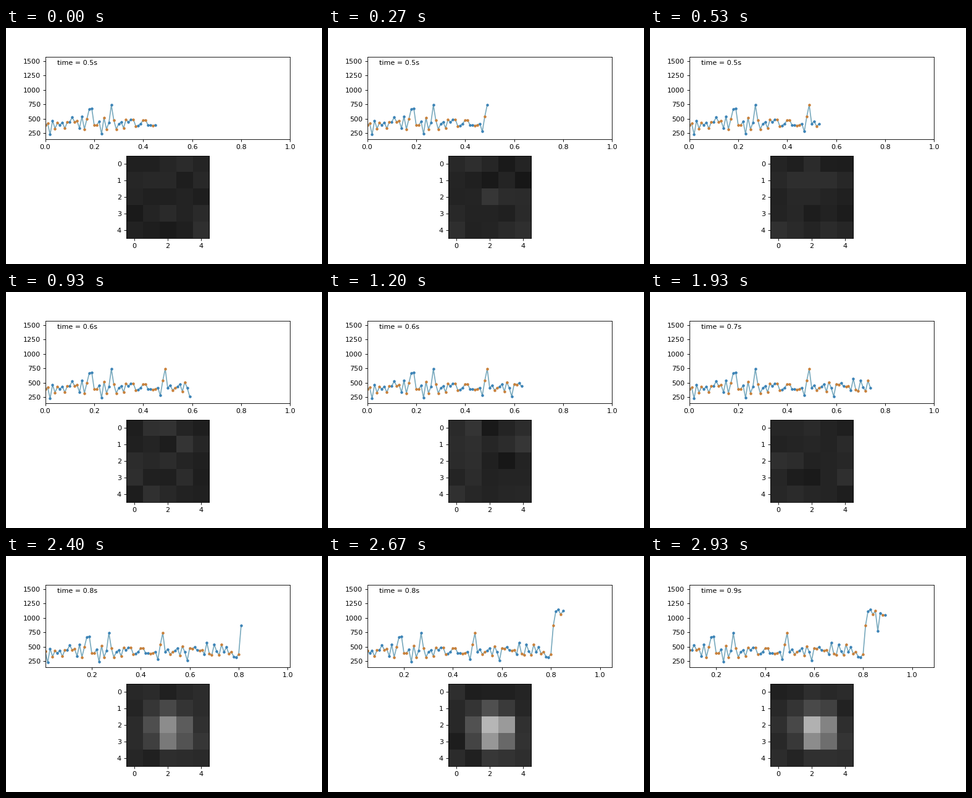
Recreate the animation shown at these times as a matplotlib script. Size 512 by 384 pixels, loop 2.99 s.

```python
import numpy as np
import matplotlib.pyplot as plt
from matplotlib.animation import FuncAnimation
from matplotlib.ticker import MultipleLocator

plt.rcParams["font.family"] = "DejaVu Sans"
plt.rcParams["font.size"] = 10

W, H, DPI = 512, 384, 80
STEP, TICKS = 23, 130     # 130 * 23 ms = one loop
RATE = 15                 # samples per second
START, COUNT = 45, 90     # sample at the loop start, samples in all
JUMP = 81                 # sample at which the bright spot appears
BLUE, ORANGE, TEAL = "#3a82b6", "#c87f38", "#78a9bd"


def make_signal():
    """Noisy low level with a few peaks, then a step up."""
    rng = np.random.default_rng(4)
    noise = np.clip(rng.normal(0, 1, COUNT), -1.8, 1.8)
    low = np.arange(COUNT) < JUMP
    y = np.where(low, 430 + 60 * noise, 1090 + 28 * noise)
    peaks = {2: 230, 18: 670, 19: 680, 23: 240, 27: 738, 47: 280,
             49: 740, 59: 265, 67: 570, JUMP: 870, 86: 775}
    y[list(peaks)] = list(peaks.values())
    return y


signal = make_signal()
times = np.arange(COUNT) / 100
rows, cols = np.mgrid[:5, :5]
spot = np.exp(-((rows - 2.35) ** 2 + (cols - 2.25) ** 2) / 1.28)


def cells(k):
    """Dark noise, plus a soft spot that follows the signal after the jump."""
    grid = np.random.default_rng(k).normal(37, 7, (5, 5))
    if k >= JUMP:
        grid += 170 * spot * (signal[k] - 390) / 700
    return grid


# Half a pixel left and down puts the frame lines on the right pixels
dx, dy = 0.45 / W, 0.45 / H
fig, (ax, im_ax) = plt.subplots(2, 1, figsize=(W / DPI, H / DPI), dpi=DPI)
fig.subplots_adjust(left=0.125 - dx, right=0.9 - dx,
                    bottom=0.11 - dy, top=0.88 - dy, hspace=0.2)

ax.set_ylim(148, 1574)
ax.xaxis.set_major_locator(MultipleLocator(0.2))
ax.yaxis.set_major_locator(MultipleLocator(250))
line, = ax.plot([], [], color=TEAL, lw=1.5)
blue, = ax.plot([], [], ".", color=BLUE)
orange, = ax.plot([], [], ".", color=ORANGE)
label = ax.text(0.05, 0.9, "", transform=ax.transAxes)

image = im_ax.imshow(cells(START), cmap="gray", vmin=0, vmax=255,
                     interpolation="nearest")
im_ax.set_xticks([0, 2, 4])
im_ax.set_yticks(range(5))


def update(i):
    k = START + int((i * STEP + 25) * RATE / 1000)
    n = np.arange(k + 1)
    x, y = times[n], signal[n]
    # Colours alternate in pairs; the second orange waits for the next point
    warm = (n % 4 == 0) | ((n % 4 == 1) & (n < k))
    line.set_data(x, y)
    blue.set_data(x[~warm], y[~warm])
    orange.set_data(x[warm], y[warm])
    left = max(0, (k - 80) / 100)
    ax.set_xlim(left, left + 1)
    label.set_text(f"time = {k / 100:.1f}s")
    image.set_data(cells(k))
    return line, blue, orange, label, image


anim = FuncAnimation(fig, update, frames=TICKS, interval=STEP,
                     repeat=True, repeat_delay=0, blit=False)
plt.show()
```
